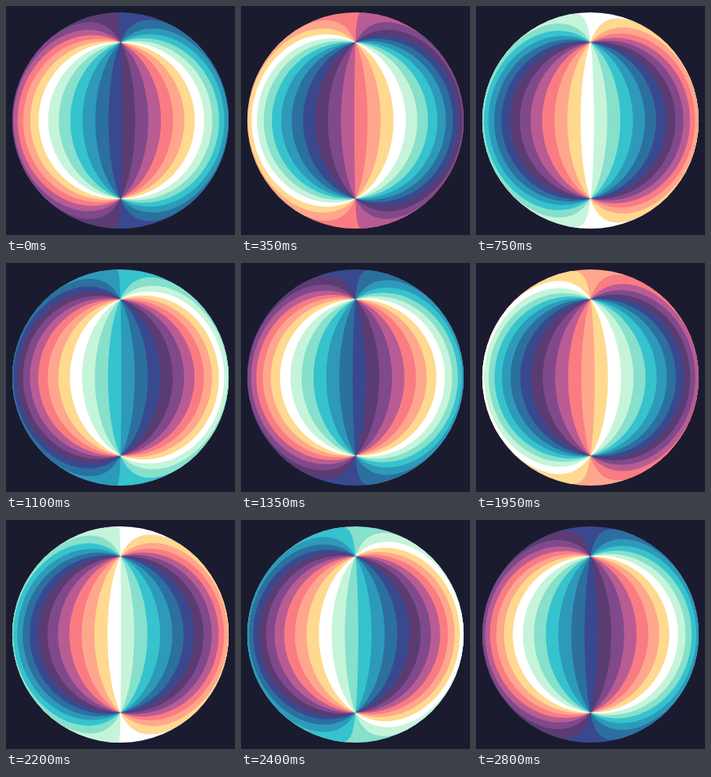
These frames come from a looping animation (287 by 287 pixels, 2.85 s). An HTML page:

```html
<!DOCTYPE html>
<html lang="en">
<head>
<meta charset="utf-8">
<title>Turning globe</title>
<style>
  html, body { margin: 0; height: 100%; overflow: hidden; background: #1b1b2f; }
  svg { display: block; width: 100%; height: 100%; }
</style>
</head>
<body>
<svg viewBox="0 0 287 287">
  <clipPath id="disc"><circle cx="143.5" cy="143.5" r="135.6"/></clipPath>
  <g id="globe" clip-path="url(#disc)"></g>
</svg>
<script>
const COLORS = [
  '#5b3c72', '#80498b', '#b95c93', '#fa7c83', '#ffa78d', '#ffd98f', '#ffffff',
  '#c6f4db', '#86e0cb', '#36c3cd', '#2d9ab9', '#2b709f', '#394990'
];
const N = COLORS.length;
const LUNES = 2 * N;
const STEP = 50, LOOP = 2850;
const CENTER = 143.5, SCALE = 138.6;
const SAMPLES = 48;
const START = -0.1;

const globe = document.getElementById('globe');

function add(tag, attrs) {
  const el = document.createElementNS('http://www.w3.org/2000/svg', tag);
  for (const name in attrs) el.setAttribute(name, attrs[name]);
  return globe.appendChild(el);
}

const base = add('circle', { cx: CENTER, cy: CENTER, r: 140 });
const lunes = Array.from({ length: LUNES - 1 }, () => add('path', {}));

const color = k => COLORS[((k % N) + N) % N];

// Lambert azimuthal equal-area projection of the whole sphere.
function project(lon, lat) {
  const z = Math.cos(lat) * Math.cos(lon);
  const r = SCALE / Math.sqrt(2 * (1 + z));
  const x = CENTER + r * Math.cos(lat) * Math.sin(lon);
  const y = CENTER - r * Math.sin(lat);
  return x.toFixed(2) + ' ' + y.toFixed(2);
}

// Samples gather near the equator, where outer meridians sweep the rim.
function meridian(lon) {
  const points = [];
  for (let i = -SAMPLES; i <= SAMPLES; i++) {
    points.push(project(lon, Math.PI / 2 * (i / SAMPLES) ** 3));
  }
  return points;
}

function draw(time) {
  const shift = START + LUNES * (time % LOOP) / LOOP;
  const first = Math.ceil(shift - N);
  const edges = Array.from({ length: LUNES },
    (_, i) => meridian((first + i - shift) * Math.PI / N));

  base.setAttribute('fill', color(first - 1));
  lunes.forEach((lune, i) => {
    // Each lune runs on under the next one so no seams show.
    const far = edges[Math.min(i + 2, LUNES - 1)];
    lune.setAttribute('d', 'M' + edges[i].concat([...far].reverse()).join('L') + 'Z');
    lune.setAttribute('fill', color(first + i));
  });
}

const begin = performance.now();
let shown = -1;

function tick() {
  const step = Math.floor((performance.now() - begin) / STEP);
  if (step !== shown) draw((shown = step) * STEP);
  requestAnimationFrame(tick);
}
tick();
</script>
</body>
</html>
```
